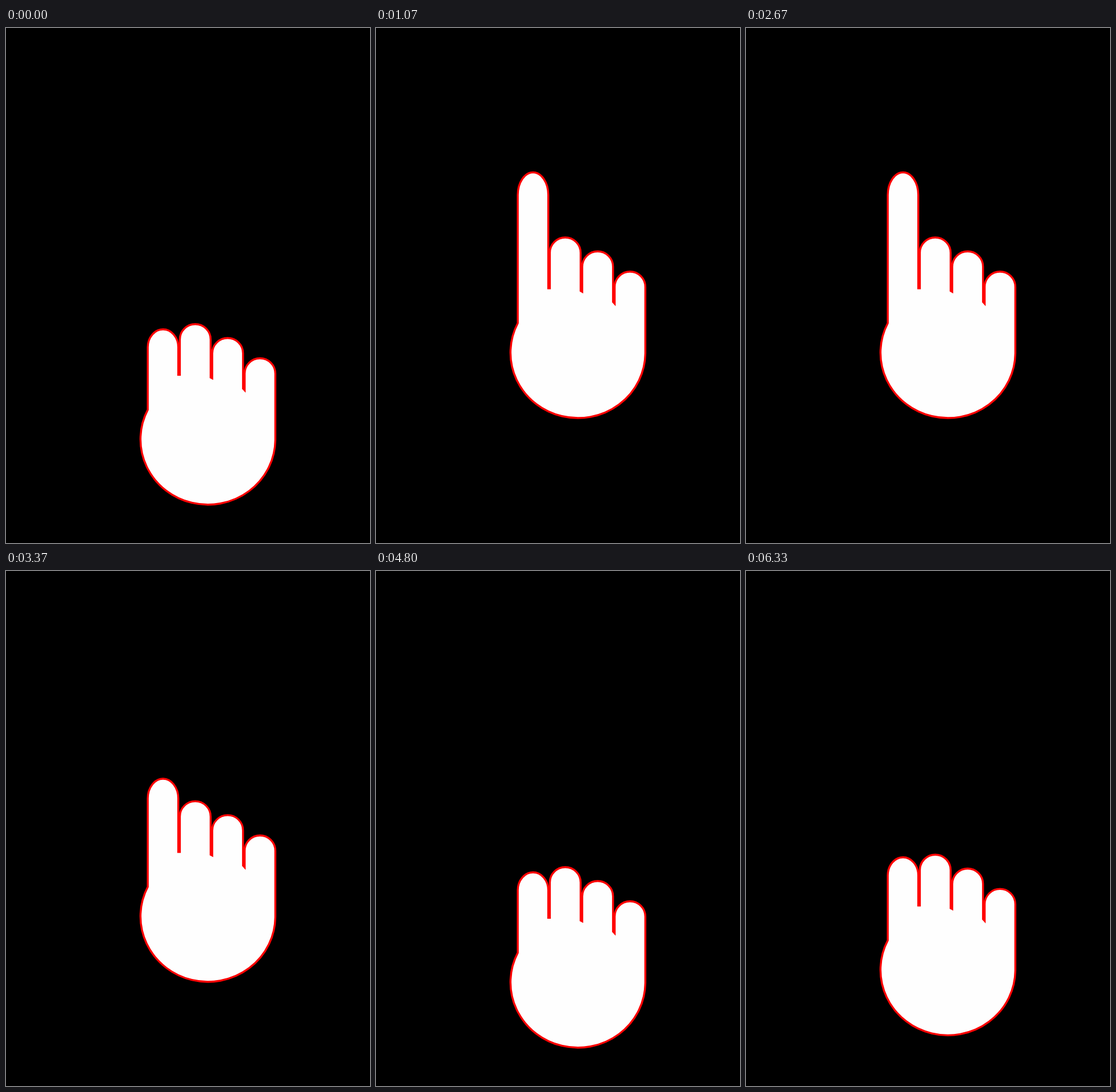
Animation, 629 px wide and 890 px high, one loop 6.41 s. Source, as an HTML page:

```html
<!DOCTYPE html>
<html lang="en">
<head>
<meta charset="utf-8">
<title>Tapping hand</title>
<style>
  html, body { margin: 0; height: 100%; overflow: hidden; background: #000; }
  svg { display: block; width: 100%; height: 100%; }
  path, circle { stroke: #f00; stroke-width: 3.4; }
</style>
</head>
<body>
<svg viewBox="0 0 629 890">
  <circle id="ripple" cx="271" cy="172" fill="none"/>
  <path id="hand" fill="#fefefe"/>
</svg>
<script>
const LOOP = 6410, TICK = 100 / 3, STEP = 2.4, LAST = 79, CYCLE = 20;
const RISE_END = 5.2, FALL_START = 10.6, RIPPLE_START = 6, RIPPLE_STEPS = 7;
const LIFT = 201, SHORT = 306, REACH = 145;

const hand = document.getElementById('hand');
const ripple = document.getElementById('ripple');
const clamp = x => Math.min(1, Math.max(0, x));
const smooth = x => x * x * (3 - 2 * x);

// One finger: up the left side, over a rounded tip, down the right side.
const finger = (left, right, tip, ry, leftEnd, rightEnd) =>
  `L${left} ${leftEnd}V${tip + ry}A${(right - left) / 2} ${ry} 0 0 1 ${right} ${tip + ry}V${rightEnd}`;

function handPath(length) {
  const tip = 826.7 - length;
  const ry = 31 + (length - SHORT) * 0.065;
  return 'M245 659.6' +
    finger(245, 297.7, tip, ry, 659.6, 599.4) +
    finger(300.4, 353.6, 511.7, 26.5, 599.4, 604) +
    finger(356.4, 409.6, 535.7, 26.5, 605.5, 623) +
    finger(412.4, 465.4, 570.7, 26.5, 626, 712) +
    'A116.5 113 0 1 1 245 659.6Z';
}

function draw(now) {
  // Poses are 80 ms apart, shown on a 30 Hz clock.
  const tick = Math.floor((now % LOOP) / TICK + 0.1);
  const phase = Math.min(LAST, Math.floor(tick / STEP + 1e-6)) % CYCLE;

  const rise = clamp(phase / RISE_END);
  const fall = clamp((phase - FALL_START) / (CYCLE - FALL_START));
  const lift = LIFT * (1 - (1 - rise) ** 1.72 - fall);
  const length = SHORT + REACH * (smooth(rise) - smooth(fall));
  hand.setAttribute('d', handPath(length));
  hand.setAttribute('transform', `translate(0 ${-lift})`);

  const spread = clamp((phase - RIPPLE_START) / RIPPLE_STEPS);
  ripple.setAttribute('r', 107.3 * (1 - (1 - spread) ** 5));
  ripple.setAttribute('opacity', spread > 0 ? 1 - spread : 0);
}

const start = performance.now();
function loop() {
  draw(performance.now() - start);
  requestAnimationFrame(loop);
}
loop();
</script>
</body>
</html>
```
